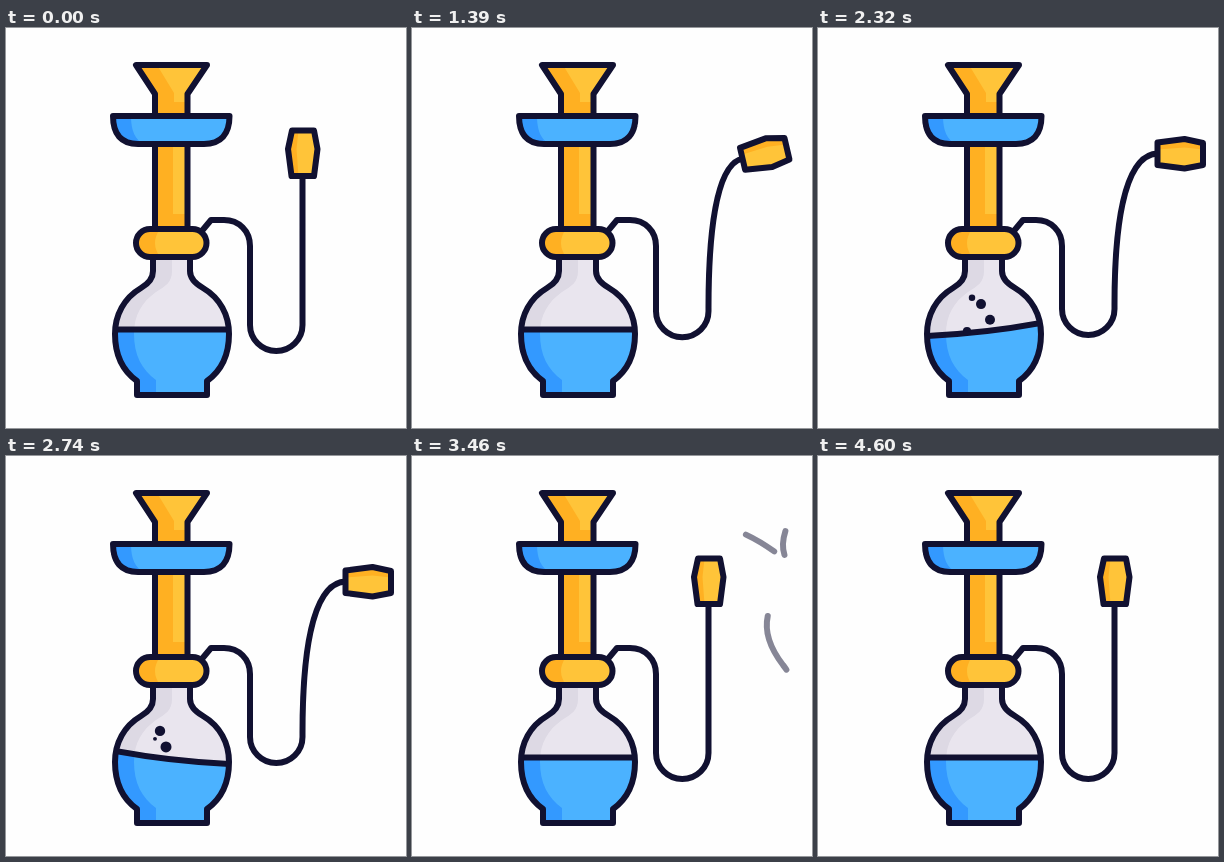
Animation, 400 px wide and 400 px high, one loop 4630 ms. Source, as an HTML page:

```html
<!DOCTYPE html>
<html lang="en">
<head>
<meta charset="utf-8">
<title>Hookah</title>
<style>
  html, body { margin: 0; width: 100%; height: 100%; overflow: hidden; background: #fefefe; }
  svg { display: block; width: 100vw; height: 100vh; }
  .ink { stroke: #111131; stroke-width: 6; stroke-linejoin: round; stroke-linecap: round; }
  .line { fill: none; }
  .gold { fill: #ffc439; }
  .amber { fill: #ffb022; }
  .sky { fill: #4bb2ff; }
  .blue { fill: #3399ff; }
  #smoke { fill: none; opacity: .5; }
</style>
</head>
<body>
<svg viewBox="0 0 400 400">
  <defs>
    <path id="bottle" d="M147 229V243C147 251 142 256 135 260C118 270 109 287 109 306C109 327 117 343 131 353V367H201V353C215 343 223 327 223 306C223 287 214 270 197 260C190 256 184 251 184 243V229Z"/>
    <path id="shade" d="M100 229H166V243C166 254 160 258 150 264C136 274 128 287 128 306C128 327 136 342 150 352V367H100Z"/>
    <path id="bowl" d="M130 37H201L181.500 66V88H149V66Z"/>
    <path id="tray" d="M107 88H223.500C223.500 106 215 116 198 116H132C115 116 107 106 107 88Z"/>
    <clipPath id="inBottle"><use href="#bottle"/></clipPath>
    <clipPath id="inLiquid"><path id="liquid"/></clipPath>
    <clipPath id="inTray"><use href="#tray"/></clipPath>
  </defs>

  <path id="hose" class="ink line"/>

  <g clip-path="url(#inBottle)">
    <path fill="#e9e5ee" d="M100 220H232V370H100Z"/>
    <use href="#shade" fill="#ddd9e4"/>
    <g clip-path="url(#inLiquid)">
      <path class="sky" d="M100 220H232V370H100Z"/>
      <use href="#shade" class="blue"/>
    </g>
    <path id="surface" class="ink line"/>
  </g>
  <g id="bubbles" fill="#111131"></g>
  <use href="#bottle" class="ink line"/>

  <path class="amber" d="M149 116H181.500V201H149Z"/>
  <path class="gold" d="M167 116H181.500V186H167Z"/>
  <path class="ink line" d="M149 116H181.500V201H149Z"/>

  <use href="#bowl" class="amber"/>
  <path class="gold" d="M151 37H201L181.500 66V74H168V65Z"/>
  <use href="#bowl" class="ink line"/>

  <g clip-path="url(#inTray)">
    <path class="sky" d="M100 88H230V120H100Z"/>
    <path class="blue" d="M100 88H125C125 104 130 114 141 117H100Z"/>
  </g>
  <use href="#tray" class="ink line"/>

  <rect class="amber" x="130" y="201" width="70.500" height="28" rx="14"/>
  <path class="gold" d="M154 201H186.500A14 14 0 0 1 186.500 229H154Q144 215 154 201Z"/>
  <rect class="ink line" x="130" y="201" width="70.500" height="28" rx="14"/>

  <g id="mouthpiece">
    <path class="gold" d="M-10.500-23H11.500L15-4.500L11.500 22.500H-11L-14.500-4.500Z"/>
    <path class="amber" d="M-10.500-23H-4L-6-4.500L-4 22.500H-11L-14.500-4.500Z"/>
    <path class="ink line" d="M-10.500-23H11.500L15-4.500L11.500 22.500H-11L-14.500-4.500Z"/>
  </g>
  <g id="smoke" class="ink"></g>
</svg>

<script>
const LOOP = 4630;
const $ = id => document.getElementById(id);
const mix = (a, b, p) => a + (b - a) * p;
const span = (t, a, b) => Math.min(1, Math.max(0, (t - a) / (b - a)));
const smooth = (t, a, b) => { const u = span(t, a, b); return u * u * (3 - 2 * u); };
const slowOut = (t, a, b) => 1 - (1 - span(t, a, b)) ** 1.26;

function add(parent, tag, attrs) {
  const el = document.createElementNS('http://www.w3.org/2000/svg', tag);
  for (const key in attrs) el.setAttribute(key, attrs[key]);
  return $(parent).appendChild(el);
}

// x, top y, radius, start time
const bubbles = [
  [171, 255, 5, 1540], [149, 260, 5.5, 1785], [154, 265, 5.5, 1880],
  [163, 260, 5, 2000], [172, 258, 5, 2180], [149, 281, 5, 2280],
  [154, 255, 5.2, 2440], [160, 255, 5.5, 2600]
].map(([x, top, r, start]) => ({ top, r, start, el: add('bubbles', 'circle', { cx: x }) }));

// path, head start and end, tail start and end
const wisps = [
  ['M402 128C370 132 290 125 264 87C250 62 254 40 258 22', 2960, 3296, 3080, 3428],
  ['M402 128L389 131C350 140 345 175 371 209C392 235 385 270 347 278L333 281', 3125, 3848, 3133, 4583],
  ['M402 128C350 100 377 70 386 46C391 33 390 24 388 17L385 8', 3200, 3838, 3250, 4080],
  ['M402 128C370 100 340 74 299 68C279 65 279 50 273 36C270 26 290 22 305 30', 3200, 3955, 3260, 4236]
].map(([d, ...times]) => ({ times, el: add('smoke', 'path', { d, pathLength: 1 }) }));

function drawPipe(t) {
  const p = smooth(t, 1000, 1515) - smooth(t, 2745, 3260);
  const angle = p * Math.PI / 2;
  const cx = mix(296.5, 362, p), cy = 125.5;
  const x = cx - 22.5 * Math.sin(angle), y = cy + 22.5 * Math.cos(angle);
  const low = mix(297, 281, p);
  $('mouthpiece').setAttribute('transform', `translate(${cx} ${cy}) rotate(${p * 90})`);
  $('hose').setAttribute('d', `M${x} ${y}C${mix(296.5, 303, p)} ${mix(190, 127, p)} 296.500 ${mix(245, 210, p)}
    296.500 ${low - 4 * p}V${low}A26.250 26 0 0 1 244 ${low}V218C244 203 233 192 218 192H205L195 204`);
}

function drawLiquid(t) {
  const tilt = 6.5 * (smooth(t, 1530, 1930) - 2 * smooth(t, 1930, 2330)
    + 2 * smooth(t, 2330, 2730) - smooth(t, 2730, 3270));
  const sag = 4 * (smooth(t, 1530, 1800) - smooth(t, 3040, 3300));
  const top = `M109 ${301.5 - tilt}Q166 ${301.5 + sag} 223 ${301.5 + tilt}`;
  $('surface').setAttribute('d', top);
  $('liquid').setAttribute('d', top + 'V370H109Z');
}

function drawBubbles(t) {
  for (const { el, top, r, start } of bubbles) {
    const u = span(t, start, start + 500);
    el.setAttribute('cy', mix(305, top, u));
    el.setAttribute('r', r * Math.min(1, 10 * u, 5 * (1 - u)));
  }
}

function drawSmoke(t) {
  for (const { el, times: [a, b, c, d] } of wisps) {
    const tail = slowOut(t, c, d), length = slowOut(t, a, b) - tail;
    el.style.display = length > .002 ? '' : 'none';
    el.setAttribute('stroke-dasharray', `${Math.max(0, length)} 2`);
    el.setAttribute('stroke-dashoffset', -tail);
  }
}

function draw() {
  const t = performance.now() % LOOP;
  drawPipe(t);
  drawLiquid(t);
  drawBubbles(t);
  drawSmoke(t);
  requestAnimationFrame(draw);
}
draw();
</script>
</body>
</html>
```
